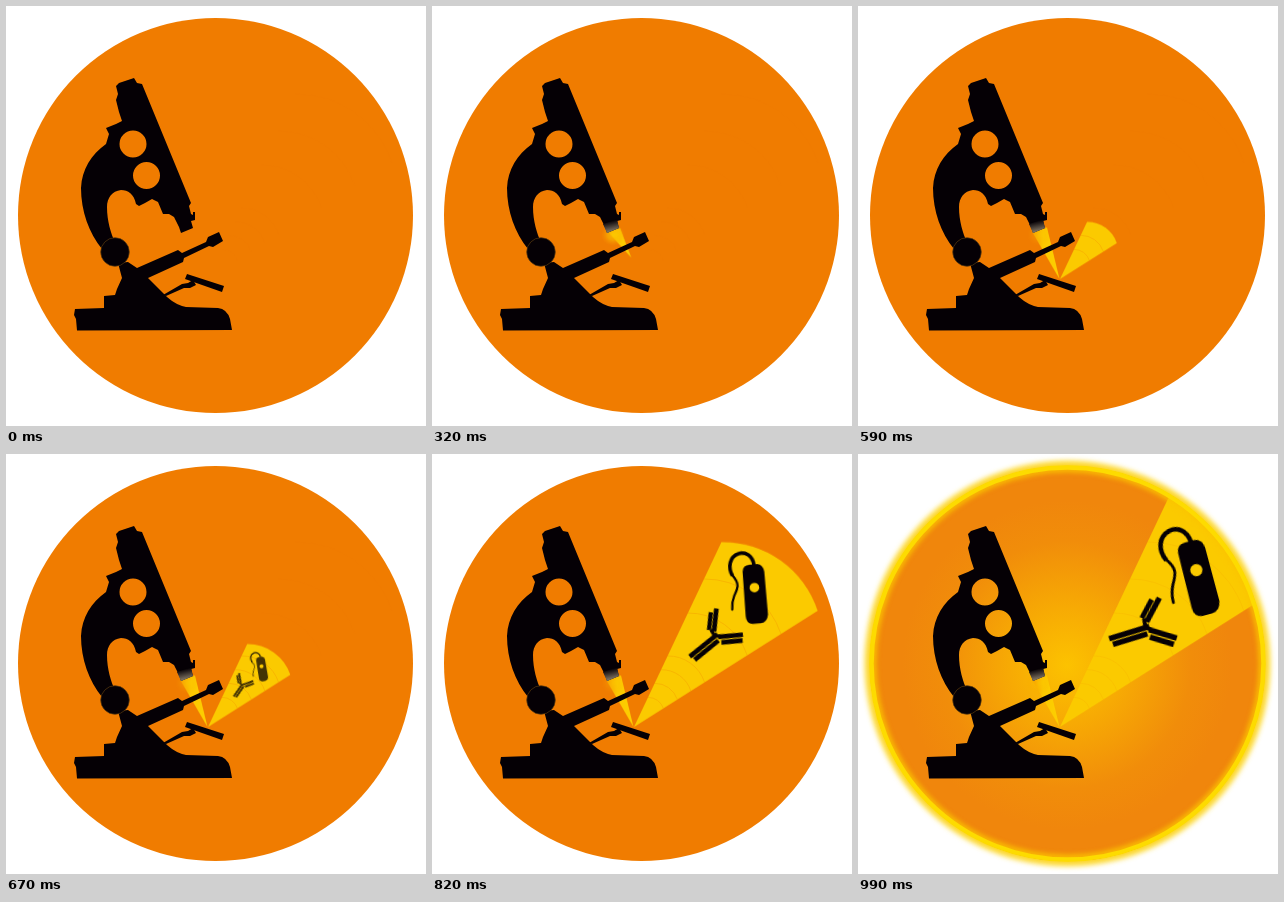
Write an HTML page without scripts that moves like this. It is 420x420 px and loops after 1490 ms.

```html
<!DOCTYPE html>
<html lang="en">
<head>
<meta charset="utf-8">
<title>Microscope</title>
<style>
  html, body { margin: 0; width: 100%; height: 100%; overflow: hidden; background: #fff; }
  svg { display: block; width: 100vw; height: 100vh; }

  .ink { fill: #050005; }
  .disc { fill: #f07c00; }
  .yellow { fill: #fbca00; }
  .line { fill: none; stroke: #050005; }

  .lens, .blob, .beam, .cone, .arcs, .ring, .halo, .cell, .anti {
    animation: 1490ms step-end infinite;
  }
  .lens { animation-name: lens; }
  .blob { animation-name: blob; }
  .beam { animation-name: beam; }
  .cone { animation-name: cone; }
  .arcs { animation-name: arcs; }
  .ring { animation-name: ring; }
  .halo { animation-name: halo; }
  .cell { animation-name: cell; }
  .anti { animation-name: anti; }

  @keyframes lens { 0% { opacity: 0; } 13.423%, 100% { opacity: 1; } }
  @keyframes blob {
    0% { opacity: 0; }
    13.423% { opacity: 1; animation-timing-function: steps(9); }
    31.544%, 100% { opacity: .25; }
  }
  @keyframes beam {
    0% { opacity: 0; transform: translate(181px, 223.5px) scale(.8, .22); }
    13.423% { opacity: 1; transform: translate(181px, 223.5px) scale(.8, .22); animation-timing-function: steps(9); }
    31.544%, 100% { opacity: 1; transform: translate(181px, 223.5px) scale(1, 1); }
  }
  @keyframes cone {
    0% { transform: translate(202px, 273px) scale(0); }
    33.557% { transform: translate(202px, 273px) scale(.11); animation-timing-function: steps(4); }
    41.611% { transform: translate(202px, 273px) scale(.48); }
    44.966% { transform: translate(202px, 273px) scale(.56); }
    48.322% { transform: translate(202px, 273px) scale(.77); }
    51.678% { transform: translate(202px, 273px) scale(1); }
    55.034% { transform: translate(202px, 273px) scale(1.25); }
    59.732%, 100% { transform: translate(202px, 273px) scale(1.65); }
  }
  @keyframes arcs { 0% { opacity: .25; } 66.443%, 100% { opacity: .1; } }
  @keyframes ring { 0% { opacity: 0; } 59.732% { opacity: 1; } 66.443%, 100% { opacity: 0; } }
  @keyframes halo { 0% { opacity: 0; } 66.443%, 100% { opacity: 1; } }
  @keyframes cell {
    0% { opacity: 0; transform: translate(248px, 222px) scale(.25) rotate(-10deg); }
    41.611% { opacity: .4; transform: translate(248px, 222px) scale(.25) rotate(-10deg); }
    44.966% { opacity: .75; transform: translate(256px, 215px) scale(.33) rotate(-10deg); }
    48.322% { opacity: .9; transform: translate(283px, 187px) scale(.48) rotate(-11deg); }
    51.678% { opacity: 1; transform: translate(308.5px, 160.5px) scale(.64) rotate(-11deg); }
    55.034% { opacity: 1; transform: translate(323px, 140px) scale(.8) rotate(-5deg); }
    59.732% { opacity: 1; transform: translate(337.5px, 118px) rotate(3deg); }
    66.443%, 100% { opacity: 1; transform: translate(340.5px, 124px) scale(1.02) rotate(-15deg); }
  }
  @keyframes anti {
    0% { opacity: 0; transform: translate(229px, 239px) scale(.26) rotate(-26deg); }
    41.611% { opacity: .4; transform: translate(229px, 239px) scale(.26) rotate(-26deg); }
    44.966% { opacity: .75; transform: translate(236.5px, 232px) scale(.37) rotate(-26deg); }
    48.322% { opacity: .9; transform: translate(258px, 211px) scale(.54) rotate(-24deg); }
    51.678% { opacity: 1; transform: translate(279px, 191px) scale(.71) rotate(-22deg); }
    55.034% { opacity: 1; transform: translate(284px, 185px) scale(.85) rotate(-10deg); }
    59.732% { opacity: 1; transform: translate(287px, 179px); }
    66.443%, 100% { opacity: 1; transform: translate(287.5px, 177px) rotate(12deg); }
  }
</style>
</head>
<body>
<svg viewBox="0 0 420 420">
  <defs>
    <radialGradient id="warm" gradientUnits="userSpaceOnUse" cx="209" cy="211" r="165">
      <stop offset="0" stop-color="#fcc200"/>
      <stop offset=".35" stop-color="#f7aa04"/>
      <stop offset=".75" stop-color="#f18d0a"/>
      <stop offset="1" stop-color="#f0860c"/>
    </radialGradient>
    <linearGradient id="ray">
      <stop offset="0" stop-color="#f79a00"/>
      <stop offset=".4" stop-color="#fcc800"/>
      <stop offset="1" stop-color="#fdd000"/>
    </linearGradient>
    <linearGradient id="tip" x2="0.25" y2="1">
      <stop offset=".25" stop-color="#050005"/>
      <stop offset="1" stop-color="#8a7d6a"/>
    </linearGradient>
    <radialGradient id="spot">
      <stop offset="0" stop-color="#fdd000"/>
      <stop offset=".45" stop-color="#fbbc00" stop-opacity=".85"/>
      <stop offset="1" stop-color="#f79a00" stop-opacity="0"/>
    </radialGradient>
    <filter id="soft" x="-10%" y="-10%" width="120%" height="120%">
      <feGaussianBlur stdDeviation="2.800"/>
    </filter>
    <clipPath id="round"><circle cx="209.5" cy="209.5" r="197.5"/></clipPath>
    <path id="arc" fill="none" stroke="#f07c00" vector-effect="non-scaling-stroke" d="M70-148A80 80 0 0 1 147-93"/>
  </defs>

  <circle class="halo" cx="209.5" cy="209.5" r="203" fill="#fddc3c" filter="url(#soft)"/>
  <circle class="disc" cx="209.5" cy="209.5" r="197.5"/>
  <circle class="halo" cx="209.5" cy="209.5" r="197.5" fill="url(#warm)"/>

  <g clip-path="url(#round)">
    <path class="cone yellow" d="M0 0L70-148A80 80 0 0 1 147-93Z"/>
    <g class="arcs">
      <g transform="translate(202 273)">
        <use href="#arc" transform="scale(.2)"/>
        <use href="#arc" transform="scale(.295)"/>
        <use href="#arc" transform="scale(.387)"/>
        <use href="#arc" transform="scale(.48)"/>
        <use href="#arc" transform="scale(.77)"/>
        <use href="#arc"/>
        <use href="#arc" transform="scale(1.25)"/>
      </g>
    </g>
  </g>
  <circle class="ring" cx="209.5" cy="209.5" r="195.8" fill="none" stroke="#f9c500" stroke-width="3.400"/>
  <g class="halo" fill="none">
    <circle cx="209.5" cy="209.5" r="194" stroke="#fbc400" stroke-width="5" filter="url(#soft)"/>
    <circle cx="209.5" cy="209.5" r="196" stroke="#fddb00" stroke-width="4.500"/>
  </g>

  <path class="beam" d="M-7 2L8-2L20.5 49.5Z" fill="url(#ray)"/>
  <ellipse class="blob" cx="181" cy="229" rx="12" ry="11" fill="url(#spot)"/>

  <g class="ink">
    <path fill-rule="evenodd" d="M110 80L113 77L128 72L131 77L136 78L185 197L183 200L185 208L187 209L187 206L189 206L189 214L185 215L187 222L175 227L173 221L168 211L163 208L157 208L152 196L146 193L139 197L133 200L130 198C128 188 122 184 115 184C106 185 101 192 101 201C101 215 105 228 109 236L96 243C83 227 75 205 75 182C76 163 85 149 100 138L103 128L100 122L110 118L116 115L113 106L110 94L112 88Z
      M113.500 138a13.500 13.500 0 1 0 27 0a13.500 13.500 0 1 0-27 0Z
      M127 169.500a13.500 13.500 0 1 0 27 0a13.500 13.500 0 1 0-27 0Z"/>
    <path d="M112 257L116 272L111 283L109 289L98 290L98 302L69 303L68 309L70 313L71 324.500L226 324L224 313Q221 303 212 302L180 301Q170 299 161 291L142 272L177 256L178 252L203 240L207 241L217 235L213 226L202 231L200 236L176 247L172 244L131 262L122 256Z"/>
    <path d="M157 289L176 278L182 277L187 274L190 279L184 282L178 282L160 290Z"/>
    <path d="M181 268L218 280L216 286L179 273Z"/>
    <circle cx="109" cy="246" r="14.300" stroke="#5a3a10" stroke-width=".7"/>
  </g>
  <path class="lens" d="M171 218L185 213L187 222L175 227Z" fill="url(#tip)"/>

  <g class="anti ink">
    <g transform="rotate(-29)">
      <rect x="-37" y="-6" width="42" height="5.500"/>
      <rect x="-35" y=".5" width="36" height="5.500"/>
    </g>
    <g transform="translate(-5 0) rotate(16)">
      <rect x="-7" y="-32" width="5" height="21"/>
      <rect x="-1.200" y="-37" width="5.500" height="27"/>
    </g>
    <g transform="rotate(5)">
      <rect x="3" y="-5" width="29" height="5.500"/>
      <rect x="6" y="1.800" width="25" height="5.500"/>
    </g>
    <path class="line" stroke-width="4" d="M-4-12L-1-4L6-2"/>
  </g>

  <g class="cell">
    <path class="line" stroke-width="4.500" d="M2-36C1-48-7-54-16-52C-28-49-31-36-26-25"/>
    <path class="line" stroke-width="2.800" stroke-linecap="round" d="M-27-27C-17-14-21-9-26 0Q-30 8-30 17"/>
    <path class="ink" fill-rule="evenodd" d="M-13-29Q-12-37-4-37H6Q13-36 14-27V27Q12 37 4 37H-6Q-14 36-14 27Z M-6-8a6 6 0 1 0 12 0a6 6 0 1 0-12 0Z"/>
  </g>
</svg>
</body>
</html>
```
